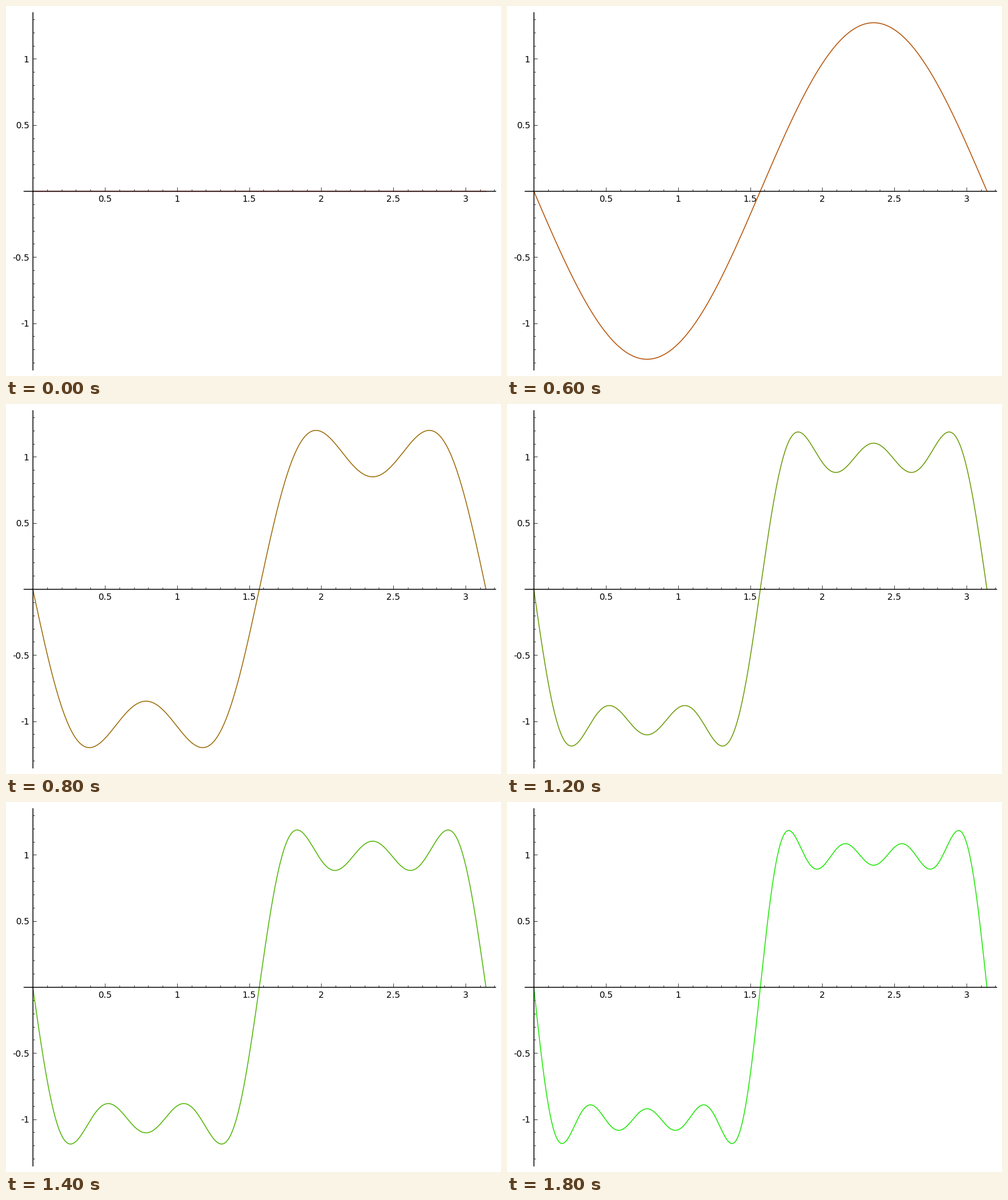
Recreate the animation shown at these times as a matplotlib script. Size 781 by 584 pixels, loop 2 s.

```python
import numpy as np
import matplotlib.pyplot as plt
from matplotlib.animation import FuncAnimation
from matplotlib.ticker import MultipleLocator

WIDTH, HEIGHT, DPI = 781, 584, 100
LEFT, RIGHT, TOP, BOTTOM = 27.9, 771.5, 10, 574  # plot area in pixels
STEPS, STEP_MS = 10, 200
PAD = 0.02  # margin around the data range

plt.rcParams.update({"font.family": "DejaVu Sans", "font.size": 10,
                     "axes.linewidth": 1.0})


def padded(low, high):
    margin = PAD * (high - low)
    return low - margin, high + margin


def partial_sum(x, step):
    """Square wave series: one more odd harmonic every second step."""
    total = np.zeros_like(x)
    for k in range(1, step, 2):
        total -= 4 / np.pi * np.sin(2 * k * x) / k
    return total


def style_axis(axis, ticks):
    axis.set_ticks(ticks, [f"{t:g}" for t in ticks])
    axis.set_minor_locator(MultipleLocator(0.1))
    axis.set_tick_params(which="major", direction="in", length=4, width=0.5, pad=4)
    axis.set_tick_params(which="minor", direction="in", length=2, width=0.5)


fig = plt.figure(figsize=(WIDTH / DPI, HEIGHT / DPI), dpi=DPI, facecolor="white")
ax = fig.add_axes([LEFT / WIDTH, 1 - BOTTOM / HEIGHT,
                   (RIGHT - LEFT) / WIDTH, (BOTTOM - TOP) / HEIGHT])
ax.set_xlim(padded(0, np.pi))
ax.set_ylim(padded(-1.3, 1.3))
for side in ("left", "bottom"):
    ax.spines[side].set_position("zero")
for side in ("right", "top"):
    ax.spines[side].set_visible(False)
style_axis(ax.xaxis, [0.5, 1, 1.5, 2, 2.5, 3])
style_axis(ax.yaxis, [-1, -0.5, 0.5, 1])

x = np.linspace(0, np.pi, 801)
curve, = ax.plot(x, np.zeros_like(x), lw=1)


def update(step):
    blend = step / STEPS
    curve.set_ydata(partial_sum(x, step))
    curve.set_color((1 - blend, blend, 0))
    return curve,


anim = FuncAnimation(fig, update, frames=STEPS, interval=STEP_MS,
                     repeat=True, repeat_delay=0)
plt.show()
```
